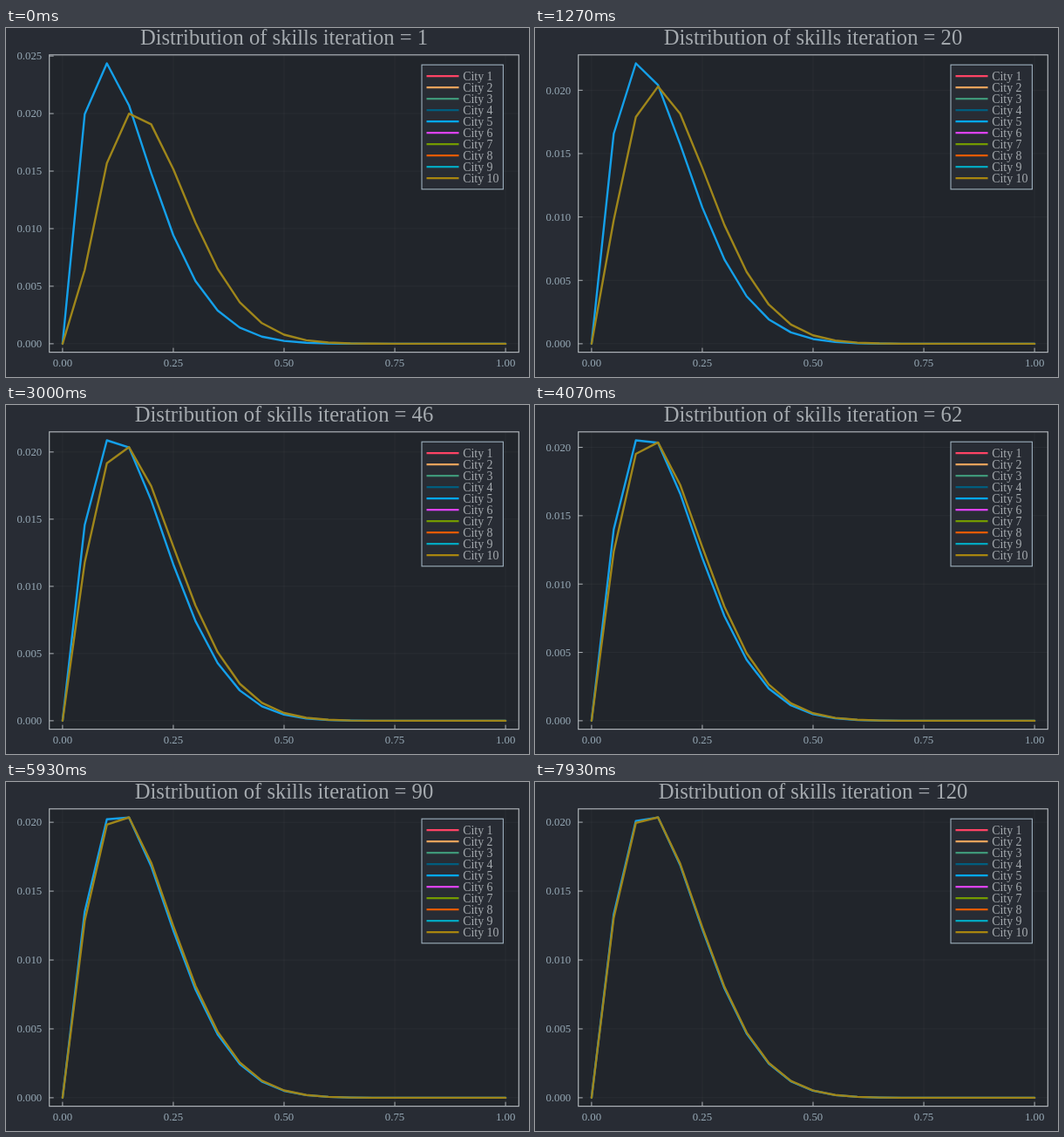
These frames come from a looping animation (600x400 px, 8 s). An HTML page:

```html
<!DOCTYPE html>
<html lang="en">
<head>
<meta charset="utf-8">
<title>Distribution of skills</title>
<style>
  html, body { margin: 0; width: 100%; height: 100%; overflow: hidden; background: #282c34; }
  svg { display: block; width: 600px; height: 400px; font-family: "Liberation Serif", serif; }
  text { fill: #9eb1be; fill-opacity: .94; font-size: 12.8px; }
  #title { fill: #adb2b7; font-size: 24.6px; text-anchor: middle; }
  .name { fill: #adb2b7; font-size: 13.9px; }
  .grid { stroke: #adb2b7; stroke-opacity: .055; }
  .tick { stroke: #adb2b7; }
  .frame { fill: none; stroke: #adb2b7; stroke-width: 1.2; }
  .curve { fill: none; stroke-width: 2.4; stroke-linejoin: round; stroke-linecap: round; }
</style>
</head>
<body>
<svg viewBox="0 0 600 400">
  <rect x="49.7" y="30.8" width="538.6" height="340.8" fill="#21252b"/>
  <g id="xAxis"></g>
  <g id="yAxis"></g>
  <rect class="frame" x="49.7" y="30.8" width="538.6" height="340.8"/>
  <polyline class="curve" id="low" stroke="#14a0ea"/>
  <polyline class="curve" id="high" stroke="#9f861a"/>
  <g id="legend">
    <rect x="477" y="42.2" width="93.4" height="142.6" fill="#282c34" stroke="#9eb1be" stroke-width="1.1"/>
  </g>
  <text id="title" x="319" y="18.8"></text>
</svg>
<script>
const NS = "http://www.w3.org/2000/svg";
const LOOP = 8000, STEPS = 20;
const LEFT = 49.7, RIGHT = 588.3, TOP = 30.8, BOTTOM = 371.6;
const X0 = 64.9, X_SPAN = 508.2, Y0 = 361.9, Y_SPAN = 321.4;
const COLORS = ["#fe4365", "#eca25c", "#3f9778", "#005d7f", "#00a8ff",
                "#dd42fa", "#739a00", "#ea5a00", "#00a8c0", "#a8850f"];
const $ = id => document.getElementById(id);

function add(parent, tag, attrs, label) {
  const el = document.createElementNS(NS, tag);
  for (const key in attrs) el.setAttribute(key, attrs[key]);
  if (label) el.textContent = label;
  parent.appendChild(el);
  return el;
}
const line = (parent, x1, y1, x2, y2, attrs) => add(parent, "line", { x1, y1, x2, y2, ...attrs });
const toX = x => X0 + X_SPAN * x;

// Beta-shaped skill distribution, scaled so the grid values sum to 0.1
const xs = Array.from({ length: STEPS + 1 }, (_, i) => i / STEPS);
function distribution(a, b) {
  const raw = xs.map(x => x ** (a - 1) * (1 - x) ** (b - 1));
  const sum = raw.reduce((s, v) => s + v, 0);
  return raw.map(v => 0.1 * v / sum);
}
const lowStart = distribution(2.143, 11.95);
const highStart = distribution(3.143, 11.95);

for (let x = 0; x <= 1; x += 0.25) {
  const px = toX(x);
  line($("xAxis"), px, TOP, px, BOTTOM, { class: "grid" });
  line($("xAxis"), px, BOTTOM, px, BOTTOM - 5, { class: "tick" });
  add($("xAxis"), "text", { x: px, y: 388, "text-anchor": "middle" }, x.toFixed(2));
}

const yTicks = Array.from({ length: 6 }, (_, i) => {
  const g = add($("yAxis"), "g", {});
  line(g, LEFT, 0, RIGHT, 0, { class: "grid" });
  line(g, LEFT, 0, LEFT + 5, 0, { class: "tick" });
  add(g, "text", { x: 41.2, y: 4.3, "text-anchor": "end" }, (i * 0.005).toFixed(3));
  return g;
});

COLORS.forEach((stroke, i) => {
  const y = 55.1 + 13 * i;
  line($("legend"), 482.5, y, 519.5, y, { stroke, "stroke-width": 2.2 });
  add($("legend"), "text", { x: 524.2, y: y + 4.6, class: "name" }, "City " + (i + 1));
});

function draw(step) {
  // Remaining gap between the two groups, and the small population drift while they mix
  const decay = Math.exp(-0.0325 * step);
  const gap = decay / (1 + 0.1 * (1 - decay));
  const drift = 0.025 * gap * (1 - gap);
  const blend = (from, to, size) =>
    from.map((v, i) => size * (v + to[i] + gap * (v - to[i])) / 2);
  const low = blend(lowStart, highStart, 1 - drift);
  const high = blend(highStart, lowStart, 1 + drift);
  const scale = Y_SPAN / Math.max(...low, ...high);
  const points = values =>
    values.map((v, i) => toX(xs[i]).toFixed(2) + "," + (Y0 - v * scale).toFixed(2)).join(" ");

  $("low").setAttribute("points", points(low));
  $("high").setAttribute("points", points(high));
  yTicks.forEach((g, i) => {
    const y = Y0 - i * 0.005 * scale;
    g.setAttribute("transform", `translate(0 ${y.toFixed(2)})`);
    g.setAttribute("visibility", y < TOP ? "hidden" : "visible");
  });
  $("title").textContent = "Distribution of skills iteration = " + (step + 1);
}

// 15 steps per second, each starting on a rounded hundredth of a second
const stepAt = t => Math.floor((Math.floor(t / 10) + 0.5) * 0.15);
const start = performance.now();
let shown = -1;
function tick() {
  const step = stepAt((performance.now() - start) % LOOP);
  if (step !== shown) draw(shown = step);
  requestAnimationFrame(tick);
}
tick();
</script>
</body>
</html>
```
